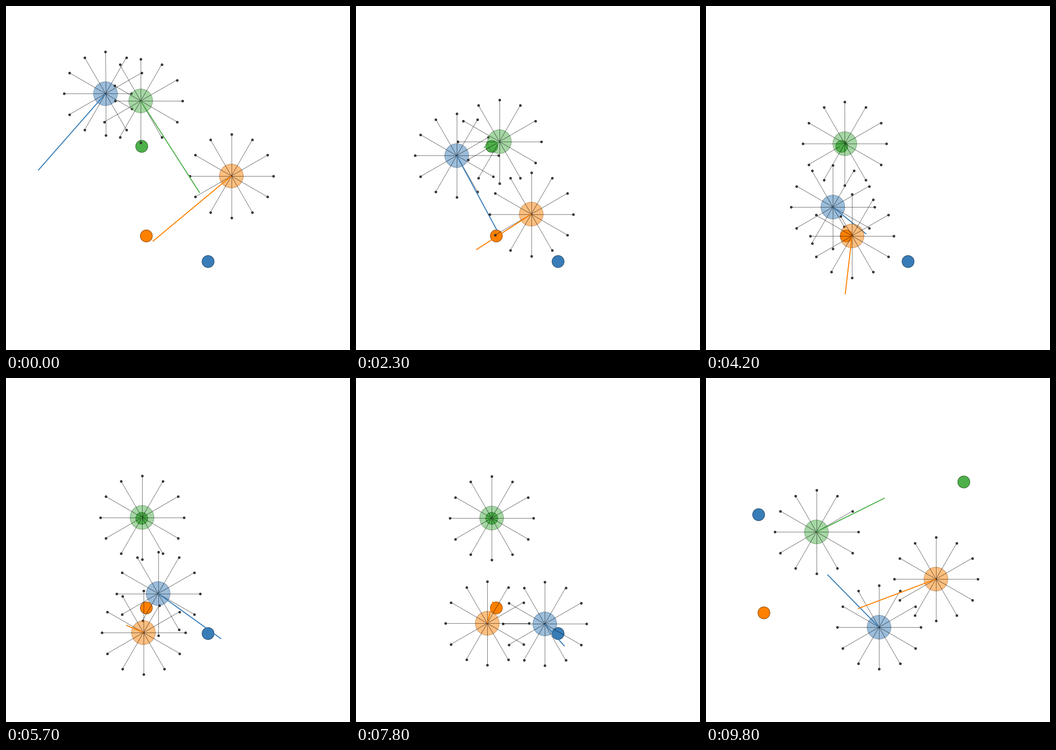
These frames come from a looping animation (700x700 px, 9900 ms). A matplotlib script:

```python
import numpy as np
import matplotlib.pyplot as plt
from matplotlib.animation import FuncAnimation
from matplotlib.collections import LineCollection
from matplotlib.patches import Circle

SIZE, DPI = 700, 100
FRAMES, INTERVAL = 99, 100
RESET = 83                      # second episode starts here
AGENT_R, GOAL_R, RAY = 24.3, 12.3, 85.0
PX = 72 / DPI                   # one pixel in points

# Key points of each episode: time, x, y, force x, force y.
AGENTS = [
    dict(
        color=(0.22, 0.49, 0.72),
        goals=[(411.6, 520.4), (107.5, 278.5)],
        runs=[
            [(0, 202.9, 178.8, -137, 156), (10, 194.5, 226.5, 10, 165),
             (23, 205.3, 304.8, 82, 152), (42, 258.5, 409.5, 68, 55),
             (57, 310, 439, 128, 92), (68, 358, 474.5, 91, 92),
             (82, 391, 508, 30, 35)],
            [(83, 398.8, 553.8, -105, -102), (98, 352.5, 507.5, -105, -107)],
        ],
    ),
    dict(
        color=(1.0, 0.50, 0.0),
        goals=[(286, 468.3), (118.3, 478.3)],
        runs=[
            [(0, 459, 346.3, -160, 133), (23, 357, 424, -112, 72.5),
             (42, 297.6, 468.2, -14, 119), (57, 280.1, 518.5, -35, -15),
             (68, 269, 513.4, -7, -44), (82, 269, 493, 20, -50)],
            [(83, 538.7, 374.8, -160, 96), (98, 468.3, 409.6, -158.5, 60)],
        ],
    ),
    dict(
        color=(0.30, 0.69, 0.29),
        goals=[(276.6, 286), (525, 212)],
        runs=[
            [(0, 274.5, 193.5, 120, 187), (23, 292.2, 276.4, -32, 12),
             (42, 282.8, 280.5, -10, 7), (57, 277.2, 284.1, -3, 2),
             (68, 276.2, 284.8, -1, 1), (82, 276.5, 285.6, 0, 0)],
            [(83, 162.3, 348.4, 145, -87), (98, 225.1, 313.6, 139, -69)],
        ],
    ),
]


def march(pos, vel, forces):
    """Move a damped point mass; return its track and last velocity."""
    track = []
    for force in forces:
        pos = pos + 0.075 * vel + 0.0075 * force
        vel = 0.75 * vel + 0.1 * force
        track.append(pos)
    return np.array(track), vel


def episode(keys, moving):
    """Blend the force between keys, with a bump sized to arrive on time."""
    keys = np.array(keys, float)
    pos, force = keys[0, 1:3], keys[0, 3:]
    vel = 0.1 * force * moving
    tracks, forces = [pos[None]], [force[None]]
    for a, b in zip(keys, keys[1:]):
        steps = int(b[0] - a[0])
        s = np.arange(1, steps + 1)[:, None] / steps
        blend = a[3:] + (b[3:] - a[3:]) * s
        bump = s * (1 - s) ** 2
        miss = b[1:3] - march(pos, vel, blend)[0][-1]
        blend = blend + bump * miss / march(0, 0, bump)[0][-1]
        track, vel = march(pos, vel, blend)
        pos = track[-1]
        tracks.append(track)
        forces.append(blend)
    return np.concatenate(tracks), np.concatenate(forces)


def simulate(runs):
    parts = [episode(keys, moving) for keys, moving in zip(runs, (True, False))]
    return [np.concatenate(arrays) for arrays in zip(*parts)]


ANGLES = np.arange(12) * np.pi / 6
DIRS = np.column_stack([np.cos(ANGLES), np.sin(ANGLES)])


def cast_rays(origin, others):
    """End points of the sensor rays, cut short by other agents."""
    dist = np.full(len(DIRS), RAY)
    for centre in others:
        rel = centre - origin
        along = DIRS @ rel
        gap = AGENT_R ** 2 - (rel @ rel - along ** 2)
        hit = (gap >= 0) & (along > 0)
        reach = along - np.sqrt(np.maximum(gap, 0))
        dist = np.where(hit, np.clip(reach, 0, dist), dist)
    return origin + DIRS * dist[:, None]


fig = plt.figure(figsize=(SIZE / DPI, SIZE / DPI), dpi=DPI, facecolor="white")
ax = fig.add_axes([0, 0, 1, 1])
ax.set_xlim(0.4, SIZE + 0.4)
ax.set_ylim(SIZE + 0.4, 0.4)
ax.axis("off")


def disc(radius, color, alpha, z):
    rim = tuple(0.5 * c for c in color)
    patch = Circle((0, 0), radius, facecolor=(*color, alpha),
                   edgecolor=(*rim, 0.8 * alpha), lw=1.2 * PX, zorder=z)
    return ax.add_patch(patch)


class AgentView:
    def __init__(self, agent, z):
        color = agent["color"]
        self.goals = agent["goals"]
        self.pos, self.force = simulate(agent["runs"])
        self.goal = disc(GOAL_R, color, 1.0, 1)
        self.body = disc(AGENT_R, color, 0.5, z)
        self.rays = LineCollection([], colors=[(0, 0, 0, 0.55)],
                                   linewidths=PX, zorder=z + 0.1)
        ax.add_collection(self.rays)
        self.dots, = ax.plot([], [], "o", ms=4.4 * PX, mfc="#404040",
                             mec="#202020", mew=0.8 * PX, zorder=z + 0.2)
        self.arrow, = ax.plot([], [], color=color, lw=2 * PX,
                              solid_capstyle="butt", zorder=z + 0.3)

    def draw(self, i, others):
        p = self.pos[i]
        tip = p + self.force[i]
        ends = cast_rays(p, others)
        self.goal.center = self.goals[i >= RESET]
        self.body.center = p
        self.rays.set_segments([(p, e) for e in ends])
        self.dots.set_data(ends[:, 0], ends[:, 1])
        self.arrow.set_data([p[0], tip[0]], [p[1], tip[1]])


views = [AgentView(agent, 2 + k) for k, agent in enumerate(AGENTS)]


def update(i):
    for view in views:
        view.draw(i, [other.pos[i] for other in views if other is not view])
    return []


anim = FuncAnimation(fig, update, frames=FRAMES, interval=INTERVAL,
                     repeat=True, repeat_delay=0, blit=False)
plt.show()
```
